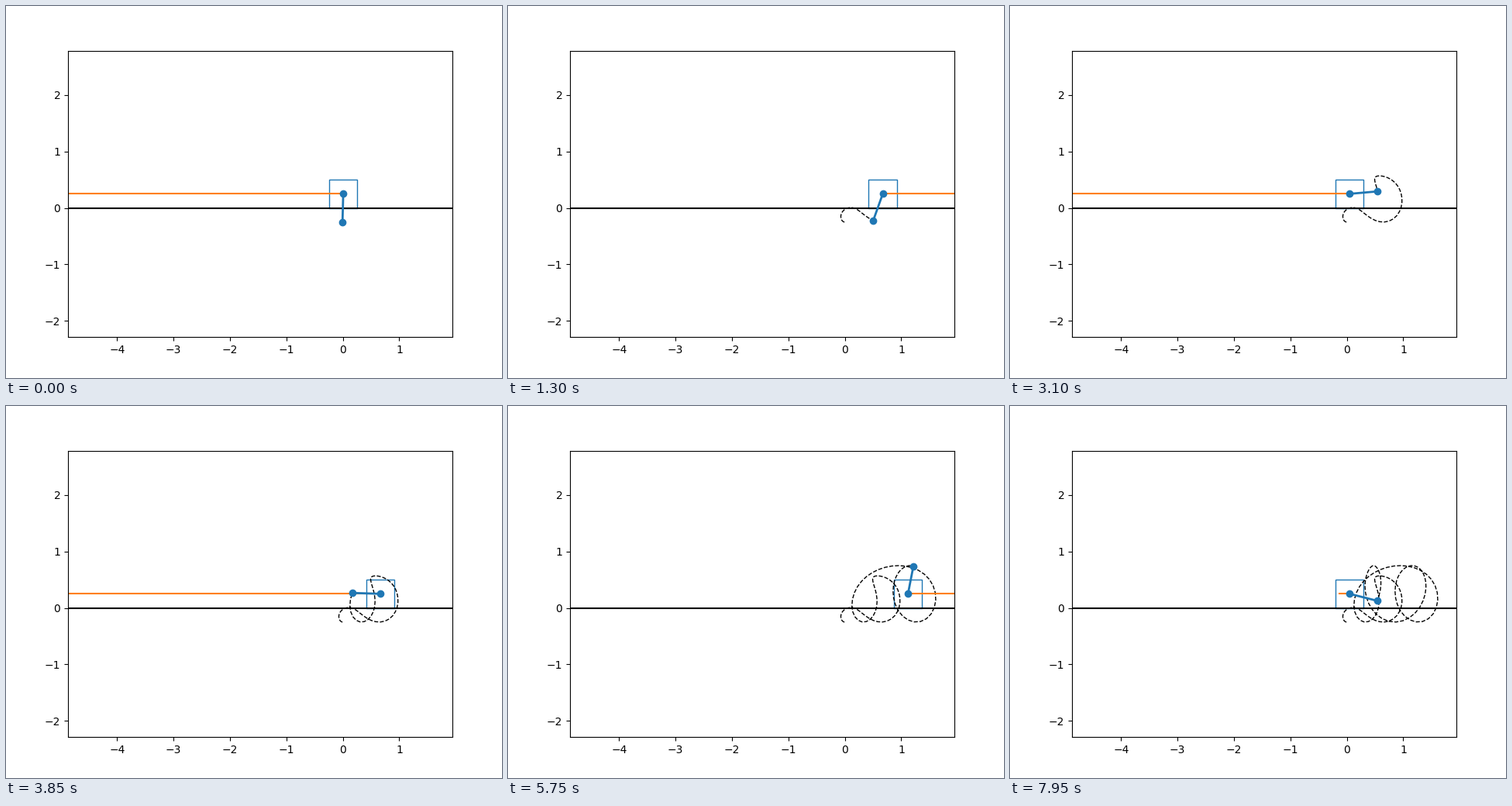
A matplotlib script that plays this animation: 640x480 px, repeating every 8000 ms.

```python
import matplotlib.pyplot as plt
import numpy as np
from matplotlib.animation import FuncAnimation

FRAMES = 160
STEP = 0.05            # seconds per frame
POLE = 0.5
POLE_SHARE = 0.3 / 1.3  # bob mass over total mass
CART_Y = 0.25
SIDE = 0.5
FULL = 8.0             # bar length at full force, longer than the view
FLIPS = 0.7, 2.35, 4.15

# Key poses: pole angle in degrees from hanging, every 0.3 s,
# and centre of mass in hundredths, every 0.5 s
SWING = [-1.5, -26, -51.5, -60.6, -38, 27, 91, 122, 129.5, 124, 105, 63,
         -20.5, -104.5, -170, -239, -332, -428, -496.5, -543.5, -595,
         -672, -762.5, -835, -883, -921.5, -972.5, -1038]
CENTRE = [0.4, 20.2, 52.3, 64.6, 48.9, 24.2, 15.1, 31.3, 68.9, 116.7,
          126.1, 118.9, 106.8, 83.2, 63.4, 38.9, 13.6]


def spline(values, gap, t):
    """Natural cubic spline through values spaced evenly in time."""
    y = np.asarray(values, float)
    n = len(y)
    A, b = np.eye(n), np.zeros(n)
    for k in range(1, n - 1):
        A[k, k - 1:k + 2] = 1, 4, 1
        b[k] = 6 * (y[k - 1] - 2 * y[k] + y[k + 1])
    m = np.linalg.solve(A, b)
    u = t / gap
    k = np.clip(u.astype(int), 0, n - 2)
    s = u - k
    r = 1 - s
    return (r * y[k] + s * y[k + 1]
            + ((r**3 - r) * m[k] + (s**3 - s) * m[k + 1]) / 6)


def force(t):
    """Full push, reversed at each flip, easing through zero at the end."""
    sign = (-1) ** sum(t > flip for flip in FLIPS)
    return max(sign * FULL, 2 * (t - 7.86)) if t > 6.8 else sign * FULL


time = np.arange(FRAMES) * STEP
phi = np.radians(spline(SWING, 0.3, time))
# The cart recoils against the swinging bob
cart_x = spline(CENTRE, 0.5, time) / 100 - POLE_SHARE * POLE * np.sin(phi)
tip_x = cart_x + POLE * np.sin(phi)
tip_y = CART_Y - POLE * np.cos(phi)

fig, ax = plt.subplots(figsize=(6.4, 4.8), dpi=100)
ax.set_xlim(-4.870, 1.9415)
ax.set_ylim(-2.288, 2.787)

ax.axhline(0, color="k")
box = ax.add_patch(plt.Rectangle((0, 0), SIDE, SIDE, fill=False,
                                 edgecolor="C0", linewidth=1))
trail, = ax.plot([], [], "k--", linewidth=1)
push, = ax.plot([], [], color="C1")
pole, = ax.plot([], [], "o-", color="C0", linewidth=2)


def draw(i):
    x = cart_x[i]
    box.set_x(x - SIDE / 2)
    trail.set_data(tip_x[:i + 1], tip_y[:i + 1])
    push.set_data([x - force(time[i]), x], [CART_Y, CART_Y])
    pole.set_data([x, tip_x[i]], [CART_Y, tip_y[i]])
    return box, trail, push, pole


anim = FuncAnimation(fig, draw, frames=FRAMES, interval=STEP * 1000,
                     repeat=True, repeat_delay=0)
plt.show()
```
